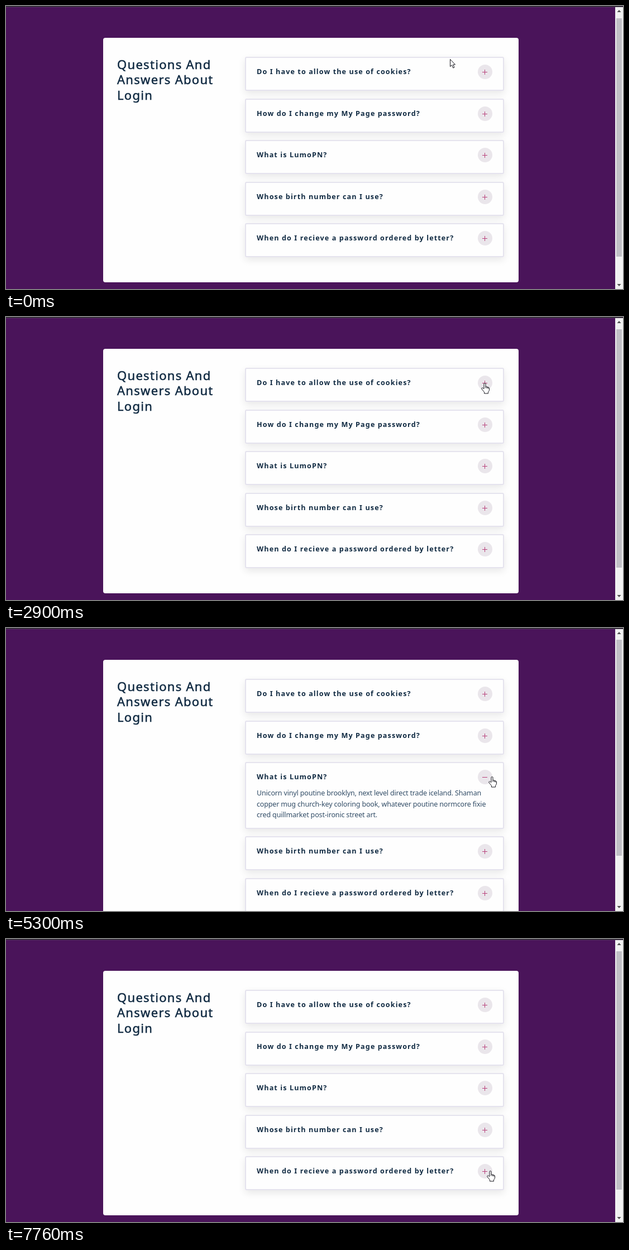
Recreate the animation shown at these times as an HTML page. Size 1105x507 px, loop 8000 ms.

```html
<!DOCTYPE html>
<html lang="en">
<head>
<meta charset="utf-8">
<title>Questions and answers</title>
<style>
html, body { margin: 0; width: 100%; height: 100%; overflow: hidden; }
body { position: relative; background: #4a145a; font-family: "Noto Sans", "Open Sans", sans-serif; color: #102a42; }
body * { box-sizing: border-box; }
h1, h2, p, .panel, .card, .bar, .thumb, .topline, button, #cursor { position: absolute; margin: 0; white-space: nowrap; }
.topline { left: 0; top: 0; width: 100%; height: 2px; background: #1d1a20; border-bottom: 1px solid #51405a; }
.panel { left: 174px; top: 57px; width: 744px; background: #fefefe; border-radius: 4px; }
h1 { left: 25px; top: 34px; font-size: 22px; font-weight: 400; line-height: 27.4px; letter-spacing: 1.3px; -webkit-text-stroke: .5px; }
.card { left: 428px; width: 464px; background: #fefefe; border: 2px solid #e5e3ee; border-radius: 3px; box-shadow: 0 5px 14px rgba(0,0,0,.09); }
h2 { left: 19px; top: 15px; font-size: 12.6px; line-height: 20px; letter-spacing: 1.1px; }
p { left: 19px; top: 44.4px; font-size: 12.5px; line-height: 19.55px; letter-spacing: -.16px; color: #324d67; }
button { left: 415px; top: 12px; width: 26px; height: 26px; padding: 0; border: 0; border-radius: 50%; background: #eae6eb; }
button::before, .closed button::after { content: ""; position: absolute; left: 8px; top: 13px; width: 9px; height: 1px; background: #b8407a; }
.closed button::after { transform: rotate(90deg); }
.closed p { display: none; }
.bar { left: 1091px; top: 2px; width: 14px; height: 505px; background: #f1f1f1; }
.bar svg { position: absolute; left: 0; top: -2px; }
.thumb { left: 1093px; width: 10px; background: #c1c0c6; }
#cursor { left: 0; top: 0; overflow: visible; }
#cursor path { fill: #fff; stroke: #15151c; stroke-linejoin: round; }
</style>
</head>
<body>
<div class="panel"><h1>Questions And<br>Answers About<br>Login</h1></div>
<div class="topline"></div>
<div class="bar"><svg width="14" height="507" fill="#505050"><path d="M3.5 11L7 7L10.5 11ZM3.5 498L7 502L10.5 498Z"/></svg></div>
<div class="thumb"></div>
<svg id="cursor" width="20" height="22">
  <path id="arrow" d="M0 0V13L3 10.3L5.3 15.5L7.5 14.5L5.2 9.5H9Z"/>
  <path id="hand" d="M-1.5 10V1.5a1.5 1.5 0 0 1 3 0V6l5 1.5q1.5.5 1.5 2V13l-2 3v2.5h-7V16l-4.5-5.5q-.8-1.5.5-2 1-.3 2 .6zM1.5 6V9M4 7V9.5M6.2 7.5V10"/>
</svg>
<script>
const LOOP = 8000, PITCH = 74.5, GROWTH = 58.5;
const answer = "Unicorn vinyl poutine brooklyn, next level direct trade iceland. Shaman<br>" +
  "copper mug church-key coloring book, whatever poutine normcore fixie<br>" +
  "cred quillmarket post-ironic street art.";

// The pointer visits each button in turn; dx and dy are offsets from its centre
const visits = [
  { text: "Do I have to allow the use of cookies?", leave: 1010, arrive: 1600, dx: -5, dy: 1, open: 1860, close: 2900, drift: 4 },
  { text: "How do I change my My Page password?", leave: 3030, arrive: 3560, dx: 8, dy: 6.5, open: 3700, close: 4530 },
  { text: "What is LumoPN?", leave: 4770, arrive: 5060, dx: 12, dy: 0, open: 5300, close: 6000 },
  { text: "Whose birth number can I use?", leave: 6060, arrive: 6360, dx: 6, dy: .5, open: 6560, close: 7400, drift: -3 },
  { text: "When do I recieve a password ordered by letter?", leave: 7400, arrive: 7760, dx: 9, dy: 0 }
];
const sweepStart = [795, 96], sweepEnd = [888, 456];

const $ = s => document.querySelector(s);
const cursor = $("#cursor"), arrow = $("#arrow"), hand = $("#hand");
const panel = $(".panel"), thumb = $(".thumb");

const cards = visits.map(({ text }) => {
  const card = document.createElement("div");
  card.innerHTML = `<h2>${text}</h2><button></button><p>${answer}</p>`;
  cursor.before(card);
  return card;
});

const progress = (t, from, to) => Math.min(1, Math.max(0, (t - from) / (to - from)));
const easeOut = u => 1 - (1 - u) ** 3;
const mix = (a, b, u) => a.map((v, k) => v + (b[k] - v) * u);
const buttonAt = i => [858, 118 + i * PITCH];

// Resting point on a button, with a small drift while its answer is open
function restAt(i, t) {
  const { dx, dy, open, drift = 0 } = visits[i], [x, y] = buttonAt(i);
  return [x + dx + (drift && drift * progress(t, open + 500, open + 670)), y + dy];
}

function pointerAt(t) {
  const i = visits.filter(v => t >= v.leave).length - 1;
  if (i < 0) return mix(sweepStart, sweepEnd, progress(t, 0, visits[0].leave) ** 2);
  const from = i ? restAt(i - 1, t) : sweepEnd;
  return mix(from, restAt(i, t), easeOut(progress(t, visits[i].leave, visits[i].arrive)));
}

function draw(t) {
  const open = visits.findIndex(v => t >= v.open && t < v.close);
  const growth = open < 0 ? 0 : GROWTH;
  cards.forEach((card, i) => {
    card.className = i === open ? "card" : "card closed";
    card.style.top = 91 + i * PITCH + (i > open ? growth : 0) + "px";
    card.style.height = 61 + (i === open ? growth : 0) + "px";
  });
  panel.style.height = 438 + growth + "px";
  thumb.style.top = (growth ? 21 : 22) + "px";
  thumb.style.height = (growth ? 387 : 427) + "px";

  // The pointer shape follows the hover state slightly late
  const [x, y] = pointerAt(t), [hx, hy] = pointerAt(t - 30);
  const hover = visits.some((_, i) => {
    const [bx, by] = buttonAt(i);
    return Math.hypot(hx - bx, hy - by) < 13;
  });
  cursor.style.transform = `translate(${Math.round(x) + .5}px, ${Math.round(y) - .5}px)`;
  arrow.style.display = hover ? "none" : "";
  hand.style.display = hover ? "" : "none";
}

const start = performance.now();
function tick() {
  draw((performance.now() - start) % LOOP);
  requestAnimationFrame(tick);
}
tick();
</script>
</body>
</html>
```
